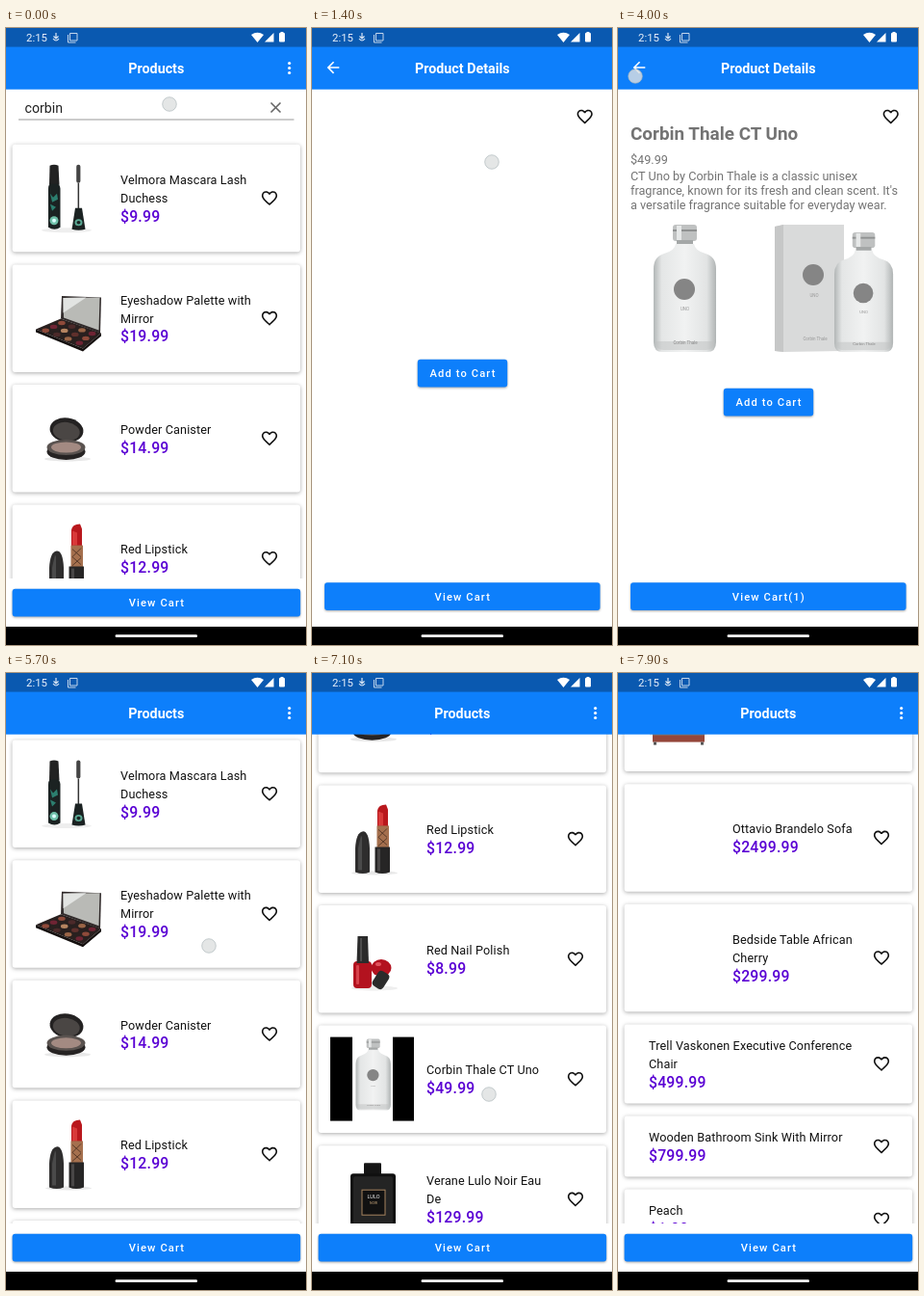
These frames come from a looping animation (312 by 640 pixels, 8000 ms). An HTML page:

```html
<!DOCTYPE html>
<html lang="en">
<head>
<meta charset="utf-8">
<title>Shop app</title>
<style>
html, body { margin: 0; width: 100%; height: 100%; overflow: hidden; background: #fff; }
svg { display: block; width: 312px; height: 640px; font-family: Roboto, "Open Sans", sans-serif; }
.card { fill: #fff; filter: drop-shadow(0 1px 2px #0005); }
.btn { fill: #0d7ffb; filter: drop-shadow(0 1px 1px #0005); }
</style>
</head>
<body>
<svg id="stage" viewBox="0 0 312 640"></svg>
<script>
const LOOP = 8000, STEP = 100;
const BLUE = '#0d7ffb';

// Drawing helpers, all returning SVG markup
const rect = (x, y, w, h, fill, r = 0, more = '') =>
  `<rect x="${x}" y="${y}" width="${w}" height="${h}" rx="${r}" fill="${fill}" ${more}/>`;
const path = (d, fill, more = '') => `<path d="${d}" fill="${fill}" ${more}/>`;
const oval = (x, y, rx, ry, fill, more = '') =>
  `<ellipse cx="${x}" cy="${y}" rx="${rx}" ry="${ry}" fill="${fill}" ${more}/>`;
const group = (x, y, inner, scale = 1, id = '') =>
  `<g id="${id}" transform="translate(${x} ${y}) scale(${scale})">${inner}</g>`;
const text = (x, y, str, size, fill, { w = 400, ls = 0, mid = false, id = '' } = {}) =>
  `<text id="${id}" x="${x}" y="${y}" font-size="${size}" font-weight="${w}" fill="${fill}" ` +
  `letter-spacing="${ls}" text-anchor="${mid ? 'middle' : 'start'}">${str}</text>`;
const button = (x, y, w, label, id = '') =>
  `<rect class="btn" x="${x}" y="${y}" width="${w}" height="28.7" rx="3"/>` +
  text(x + w / 2 + .5, y + 18.5, label, 11.2, '#fff', { w: 500, ls: 1.1, mid: true, id });

const HEART = 'M16.5 3c-1.74 0-3.41.81-4.5 2.09C10.91 3.81 9.24 3 7.5 3 4.42 3 2 5.42 2 8.5c0 3.78 3.4 6.86 8.55 11.54L12 21.35l1.45-1.32C18.6 15.36 22 12.28 22 8.5 22 5.42 19.58 3 16.5 3zm-4.4 15.55l-.1.1-.1-.1C7.14 14.24 4 11.39 4 8.5 4 6.5 5.5 5 7.5 5c1.54 0 3.04.99 3.57 2.36h1.87C13.46 5.99 14.96 5 16.5 5c2 0 3.5 1.5 3.5 3.5 0 2.89-3.14 5.74-7.9 10.05z';
const heart = (x, y) => group(x - 9.7, y - 9.8, path(HEART, '#111'), .81);

// Product pictures in an 87 x 87 box
const mascara = () =>
  oval(44, 77, 26, 2.5, '#eee') +
  path('M26.5 10q4.500-2 9 0l1 20H26z', '#222') + path('M25 34q0-5 3-5h6q3 0 3.500 5V74q-6 4-12.500 0z', '#1b2222') +
  path('M27 39l3 4 4-4 1 6-6 3zM27 50l6 3-4 4z', '#2c7f6f') + oval(31, 67, 4.5, 4.5, '#6fbfa8') +
  oval(31, 67, 2, 2, '#dff') +
  rect(54.2, 9, 4.2, 19, '#444', 2) + rect(55.6, 28, 1.5, 27, '#333') +
  path('M53 54h7l3.500 22q-7 2-14 0z', '#1b2222') + oval(56.5, 69, 4, 3.5, '#5aa893') + oval(56.5, 69, 2, 1.8, '#1b2222');

const palette = () => {
  const tones = ['#8f4a3a', '#5f302c', '#b58460', '#6f2434', '#9a6547', '#4c2a2a'];
  let pans = '';
  for (let i = 0; i < 12; i++) {
    const u = (i % 4 + .5) / 4, v = ((i >> 2) + .5) / 3;
    pans += oval(38 + 41 * u - (26 - 7 * u) * v, 45 + 14 * u + (11 + 4 * u) * v, 3.8, 2.2, tones[(i * 5 + (i >> 2)) % 6]);
  }
  return path('M39 20.5L80 22 79 59 38 44z', '#302a2a') + path('M40.500 22.500l38-.5-1 34-36.500-13z', '#b9bab6') +
    path('M40.500 22.500l24-.5-24 16z', '#e2e4e2') +
    path('M12 55l26-11 42 15-19 16z', '#29201f') + path('M12 55l49 20v3L12 58zM61 75l19-16v3L61 78z', '#15100f') + pans;
};

const powder = () =>
  oval(45, 65, 24, 2.5, '#e8e8e8') +
  oval(44, 35, 17.5, 12.5, '#242222', 'transform="rotate(8 44 35)"') +
  oval(44, 36.5, 14, 9.5, '#4a4644', 'transform="rotate(8 44 35)"') +
  oval(43.5, 57.5, 20, 8.5, '#262323') + oval(43.5, 53, 20, 8, '#5a5350') +
  oval(43.5, 53, 15.5, 5.5, '#a38a82');

const lipstick = () =>
  oval(46, 79, 24, 2, '#e8e8e8') +
  path('M26 78V53Q27 37 33.5 36T41 53v25q-7 3-15 0z', '#2e2d2d') + path('M29 76V53l3-13 1 2v34z', '#4a4a4a') +
  path('M49 31V14q1-6 9-6l2 5v18z', '#b9181d') + path('M50 30V15l5 2v13z', '#d83a3a') +
  rect(48.5, 30, 12.5, 24, '#a5704e') + path('M50 34l9 8M50 42l9 8M59 33l-9 9M59 43l-9 8', 'none', 'stroke="#5a3a28"') +
  path('M46.500 52h15.500v26q-8 3-15.500 0z', '#262525') + rect(49, 54, 3, 23, '#484646');

const polish = () =>
  oval(46, 74, 24, 2.5, '#eee') +
  oval(53, 53, 10.5, 9, '#b3121f') + oval(50, 49, 3, 2, '#e0525c') +
  `<g transform="rotate(32 54 64)">${rect(47, 57, 13, 18, '#2b2b2b', 4)}</g>` +
  rect(24, 46, 19, 28, '#b3121f', 4) + rect(27, 50, 3, 20, '#d8424c', 1) +
  path('M28.5 20h10.5l1 28H27.5z', '#2b2b2b') + rect(31, 22, 2, 24, '#4d4d4d');

// Frosted bottle, 65 x 132
const bottle = () =>
  rect(20, 0, 25, 17, '#bfc1c1', 3) + rect(20, 5, 25, 2, '#8f9191') + rect(24, 1, 5, 15, '#e6e8e8') +
  rect(24, 16, 17, 6, '#a4a7a7') +
  path('M23 20Q22 27 11 30Q0 33 0 46V122Q0 132 9 132H56Q65 132 65 122V46Q65 33 54 30Q43 27 42 20z', 'url(#glass)') +
  path('M2 121q0 9 8 9H55q8 0 8-9z', '#bfc2c2', 'opacity=".5"') +
  oval(32, 67, 11, 11, '#858585') + text(32.5, 89, 'UNO', 4.5, '#999', { mid: true }) +
  text(33, 124, 'Corbin Thale', 4.5, '#888', { mid: true });

const frosted = () => rect(0, 0, 23, 87, '#000') + rect(65, 0, 22, 87, '#000') + group(26.5, 2, bottle(), .56);

const noir = () =>
  rect(35, 6, 18, 12, '#151515', 1) + rect(21, 17, 47, 67, '#101010', 3) + rect(24, 20, 41, 61, '#242424', 2) +
  rect(33, 34, 24, 26, '#111', 0, 'stroke="#a5835f"') +
  text(45, 43, 'LULO', 5.5, '#eee', { mid: true }) + text(45, 49, 'NOIR', 3.5, '#c9a77c', { mid: true }) +
  text(45, 76, 'VERANE', 5, '#ddd', { mid: true });

const scent = (glass, cap) => () =>
  rect(36, 6, 15, 18, cap, 3) + rect(25, 24, 37, 56, glass, 9) + rect(30, 30, 5, 42, '#fff', 2, 'opacity=".4"');

const bed = () =>
  rect(17, 22, 54, 30, '#7b4a38', 3) + path('M20 40h48l5 22H14z', '#ddd8d2') +
  rect(17, 61, 54, 8, '#95473b') + rect(18, 69, 3, 3, '#555') + rect(67, 69, 3, 3, '#555') + rect(17, 60, 54, 2, '#777');

const blank = () => '';

const products = [
  ['Velmora Mascara Lash|Duchess', '9.99', mascara],
  ['Eyeshadow Palette with|Mirror', '19.99', palette],
  ['Powder Canister', '14.99', powder],
  ['Red Lipstick', '12.99', lipstick],
  ['Red Nail Polish', '8.99', polish],
  ['Corbin Thale CT Uno', '49.99', frosted],
  ['Verane Lulo Noir Eau|De', '129.99', noir],
  ["Lirane M'elore", '89.99', scent('#e3bd7d', '#cfa35a')],
  ['Belta Glint Eau de', '69.99', scent('#ead9a8', '#c9a44c')],
  ['Vessi Petal Eau de', '79.99', scent('#e6b4b0', '#222')],
  ['Ottavio Brandelo Bed', '1899.99', bed],
  ['Ottavio Brandelo Sofa', '2499.99', blank],
  ['Bedside Table African|Cherry', '299.99', blank],
  ['Trell Vaskonen Executive Conference|Chair', '499.99'],
  ['Wooden Bathroom Sink With Mirror', '799.99'],
  ['Peach', '1.99']
];
const FOUND = 5, LINE = 19, GAP = 13.1;

const tops = [];
let nextTop = 0;
const cards = products.map(([title, price, picture]) => {
  const lines = title.split('|');
  const rows = lines.length + 1;
  const h = picture ? 111.5 : rows * LINE + 25;
  const x = picture ? 119 : 32;
  const first = h / 2 - LINE * (rows - 1) / 2;
  const top = nextTop;
  tops.push(top);
  nextTop += h + GAP;
  return `<g class="item" transform="translate(0 ${top})">` +
    `<rect class="card" x="6.6" y="0" width="299.4" height="${h}" rx="3"/>` +
    (picture ? group(19, 12, picture()) : '') +
    lines.map((s, i) => text(x, first + i * LINE + 4.5, s, 12.65, '#111', { ls: .12 })).join('') +
    text(x, first + lines.length * LINE + 5.3, '$' + price, 15.8, '#5a00d4', { w: 500, ls: .2 }) +
    heart(274, h / 2) + '</g>';
}).join('');

const search =
  text(19.5, 88, 'corbin', 14.2, '#222') + rect(13, 94.5, 286.5, 1, '#999') +
  path('M275.5 77.5l10 10m0-10l-10 10', 'none', 'stroke="#666" stroke-width="1.6"');

const loaded =
  text(13, 116, 'Corbin Thale CT Uno', 18.9, '#737373', { w: 700 }) +
  ['$49.99', 'CT Uno by Corbin Thale is a classic unisex',
    "fragrance, known for its fresh and clean scent. It's",
    'a versatile fragrance suitable for everyday wear.']
    .map((s, i) => text(13, i ? 143 + i * 15 : 141, s, 12.65, '#737373')).join('') +
  group(37, 204, bottle()) +
  path('M163 206l9-2h63v131l-63 1-9-1z', '#d9dada') + path('M163 206l9-2v132l-9-1z', '#c6c7c7') +
  oval(203, 256, 11, 11, '#858585') + text(204, 279, 'UNO', 4.5, '#999', { mid: true }) +
  text(205, 324, 'Corbin Thale', 4.5, '#999', { mid: true }) +
  group(225, 212, bottle(), .94);

const chrome =
  rect(0, 0, 312, 20, '#0a59b0') + rect(0, 19.6, 312, 44.1, BLUE) +
  text(21, 14, '2:15', 11.4, '#e8f0fa') +
  path('M52 5v6m-2.5-2.5l2.5 2.5 2.5-2.5M49 11q3 4 6 0', 'none', 'stroke="#dbe7f5" stroke-width="1.2"') +
  path('M66.5 5.5h7.5v7.5h-7.5zM64.5 7v8h8', 'none', 'stroke="#c3d6ec"') +
  path('M255 7q6.5-4.5 13 0l-6.5 8z', '#fff') + path('M278.5 5v9.500h-9.500z', '#fff') +
  rect(284, 5, 6, 9.5, '#fff', 1) + rect(285.5, 4, 3, 2, '#fff') +
  rect(0, 621, 312, 19, '#000') + rect(113.6, 629.3, 85.4, 2.7, '#fff', 1.3);

const title = s => text(156.3, 47, s, 14.3, '#fff', { w: 700, mid: true });

stage.innerHTML =
  `<defs><linearGradient id="glass"><stop stop-color="#b2b6b6"/><stop offset=".13" stop-color="#e4e6e6"/>
  <stop offset=".5" stop-color="#f1f2f2"/><stop offset=".85" stop-color="#e2e4e4"/>
  <stop offset="1" stop-color="#b0b4b4"/></linearGradient></defs>` +
  group(0, 0, cards, 1, 'list') + group(0, 0, search, 1, 'finder') + group(0, 0, loaded, 1, 'details') + chrome +
  group(0, 0, rect(0, 571, 312, 50, '#fff') + button(6.6, 581.8, 299.6, 'View Cart') + title('Products') +
    [36.5, 41.5, 46.5].map(y => oval(294.7, y, 1.6, 1.6, '#fff')).join(''), 1, 'home') +
  group(0, 0, title('Product Details') +
    group(12.5, 31.6, path('M20 11H7.83l5.59-5.59L12 4l-8 8 8 8 1.41-1.41L7.83 13H20v-2z', '#fff'), .79) +
    heart(283.7, 92) + group(0, 0, button(109.8, 343.8, 93.4, 'Add to Cart'), 1, 'add') +
    button(13, 575.2, 286.6, 'View Cart', 'cart'), 1, 'product') +
  group(0, 0, oval(0, 0, 7.3, 7.3, '#dee0e0d0', 'stroke="#a9b4b8a0"'), 1, 'touch');

// Keys are [time, value, ...]; values run straight between them
function at(keys, t) {
  const i = keys.findIndex(k => k[0] > t);
  if (i < 0) return keys[keys.length - 1].slice(1);
  if (i === 0) return keys[0].slice(1);
  const a = keys[i - 1], b = keys[i];
  const u = (t - a[0]) / (b[0] - a[0]);
  return a.slice(1).map((v, k) => v + (b[k + 1] - v) * u);
}

const touchKeys = [
  [300, 170, 79], [1100, 187, 139], [2600, 187, 139], [3100, 158, 390], [3300, 158, 390],
  [3600, 66, 50], [3900, 66, 50], [4000, 18, 50], [4100, 18, 50], [4400, 120, 180], [5600, 120, 180],
  [5700, 211, 283], [6200, 245, 130], [6900, 245, 122], [7100, 184, 437], [7500, 240, 120], [7700, 330, 90]
];
const scrollKeys = [
  [5700, 0], [5800, 22], [6200, 201], [6400, 268], [6600, 310], [6800, 327], [7100, 327],
  [7200, 355], [7400, 580], [7700, 1080], [7900, 1325]
];

const $ = id => document.getElementById(id);
const show = (id, on) => { $(id).style.display = on ? '' : 'none'; };
const move = (id, x, y) => $(id).setAttribute('transform', `translate(${x} ${y})`);
const items = document.querySelectorAll('.item');

function draw(now) {
  const t = Math.floor(now % LOOP / STEP) * STEP;
  const inDetails = t >= 1400 && t < 4200;
  const searching = t < 1400;
  const filtered = searching && t >= 300;
  const ready = t >= 1600;

  show('list', !inDetails);
  show('home', !inDetails);
  show('product', inDetails);
  show('finder', searching);
  show('details', inDetails && ready);

  items.forEach((el, i) => { el.style.display = filtered && i !== FOUND ? 'none' : ''; });
  move('list', 0, (searching ? 120.8 : 69.6) - (filtered ? tops[FOUND] : at(scrollKeys, t)[0]));
  move('add', 0, ready ? 30 : 0);
  $('cart').textContent = t >= 3100 ? 'View Cart(1)' : 'View Cart';
  move('touch', ...at(touchKeys, t));
}

const start = performance.now();
(function tick() {
  draw(performance.now() - start);
  requestAnimationFrame(tick);
})();
</script>
</body>
</html>
```
